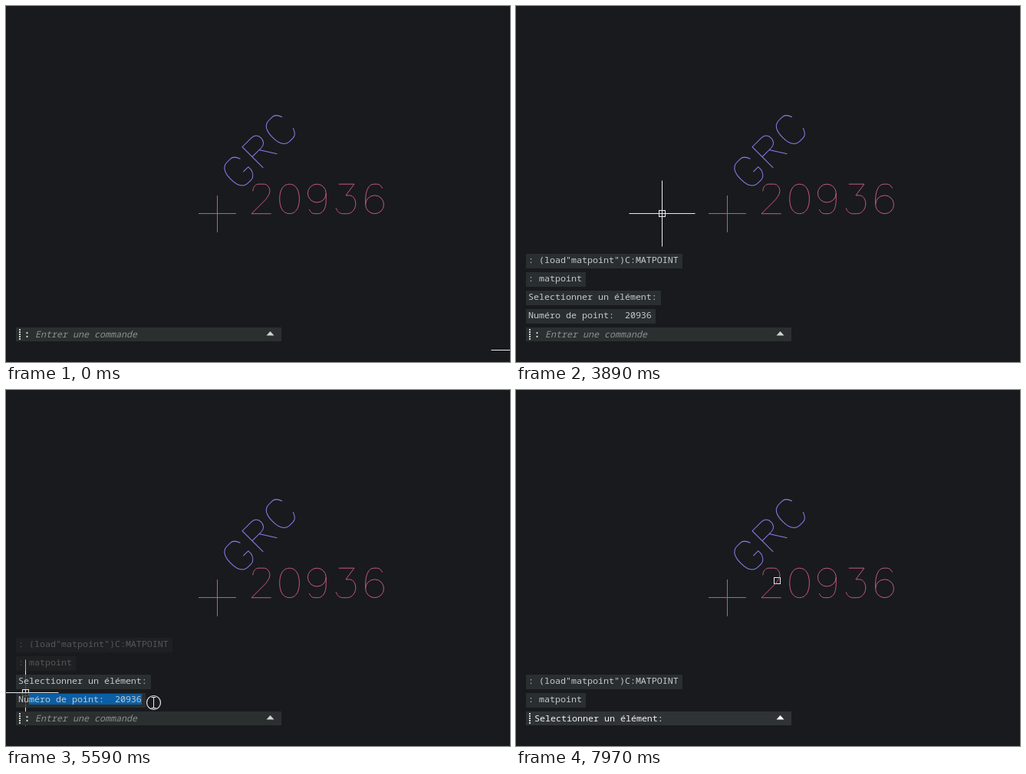
Animation of 657x464 px, one loop 8 s. Source, as an HTML page with a canvas:

```html
<!DOCTYPE html>
<html lang="fr">
<head>
<meta charset="utf-8">
<title>matpoint</title>
<style>
  html, body { margin: 0; width: 100%; height: 100%; overflow: hidden; background: #191a1d; }
  canvas { display: block; }
</style>
</head>
<body>
<canvas id="stage" width="657" height="464"></canvas>
<script>
const ctx = document.getElementById('stage').getContext('2d');
const LOOP = 8000;
const CHAR = 7;
const FONT = '11.667px "Noto Sans Mono", "DejaVu Sans Mono", monospace';
const PINK = '#c55a79', VIOLET = '#8d7cea', WHITE = '#e9eaea';

// Single-stroke glyphs on a 21 unit cap height, y up
const BOWL = 'M18 16C17 19 15.5 21 13 21H9C5 20.5 3 16.5 3 10.5S5 .5 9 0H13C15.5 0 17 2 18 5';
const GLYPHS = {
  C: BOWL,
  G: BOWL + 'V8H13',
  R: 'M4 0V21H13C16 21 18 19 18 16S16 11 13 11H4M11 11L18 0',
  0: 'M10 21C5 21 3 16 3 10.5S5 0 10 0S17 5 17 10.5S15 21 10 21',
  2: 'M4 16C4 19 6 21 8 21H12C14 21 16 19 16 16C16 14 14.5 12 13 10L3 0H17',
  3: 'M5 21H16L10 13H13C15.5 12.5 17 10 17 7C17 3 14 0 11 0H8C5.5 0 4 1.5 3 4',
  6: 'M16 18C15 20 14 21 12 21H10C6 21 4 16 4 9.5V6.5A6.5 6.5 0 1 1 17 6.5A6.5 6.5 0 1 1 4 6.5',
  9: 'M16 14.5A6.5 6.5 0 1 1 3 14.5A6.5 6.5 0 1 1 16 14.5V10C16 3 13.5 0 10 0H8C6 0 5 1 4 3'
};
const PATHS = Object.fromEntries(Object.entries(GLYPHS).map(([k, d]) => [k, new Path2D(d)]));

const LOAD = ': (load"matpoint")C:MATPOINT';
const RUN = ': matpoint';
const PICK = 'Selectionner un élément:';
const RESULT = 'Numéro de point:  20936';

const clamp = v => Math.max(0, Math.min(1, v));
const mix = (a, b, u) => a + (b - a) * u;
const span = (t, a, b) => clamp((t - a) / (b - a));
const easeOut = u => 1 - (1 - u) ** 3;
const easeInOut = u => u * u * (3 - 2 * u);

// Piecewise linear motion through [time, x, y] keys
function along(keys, t) {
  let i = 0;
  while (i < keys.length - 2 && t > keys[i + 1][0]) i++;
  const [a, b] = [keys[i], keys[i + 1]];
  const u = span(t, a[0], b[0]);
  return [mix(a[1], b[1], u), mix(a[2], b[2], u)];
}

function line(x1, y1, x2, y2, color) {
  ctx.strokeStyle = color;
  ctx.lineWidth = 1;
  ctx.beginPath();
  ctx.moveTo(x1, y1);
  ctx.lineTo(x2, y2);
  ctx.stroke();
}

function strokeText(text, x, y, angle, advance, color) {
  const scale = 1.835;
  ctx.save();
  ctx.translate(x, y);
  ctx.rotate(angle);
  ctx.scale(scale, -scale);
  ctx.strokeStyle = color;
  ctx.lineWidth = 1 / scale;
  for (const c of text) {
    ctx.stroke(PATHS[c]);
    ctx.translate(advance, 0);
  }
  ctx.restore();
}

function drawing() {
  strokeText('GRC', 302.8, 243.4, -Math.PI / 4, 21, VIOLET);
  strokeText('20936', 314.5, 270.7, 0, 20, PINK);
  line(251, 270.5, 300, 270.5, PINK);
  line(275.5, 247, 275.5, 295, PINK);
}

function pickBox(x, y) {
  ctx.strokeStyle = WHITE;
  ctx.lineWidth = 1;
  ctx.strokeRect(Math.round(x) - 3.5, Math.round(y) - 3.5, 8, 8);
}

function crosshair(x, y) {
  const cx = Math.round(x) + .5, cy = Math.round(y) + .5;
  line(cx - 43, cy, cx + 43, cy, WHITE);
  line(cx, cy - 43, cx, cy + 43, WHITE);
  pickBox(x, y);
}

function textCursor(x, y) {
  ctx.strokeStyle = WHITE;
  ctx.lineWidth = 1.2;
  ctx.beginPath();
  ctx.arc(x + .5, y + .5, 9, 0, 7);
  ctx.stroke();
  const cx = Math.round(x) + .5;
  line(cx, y - 6, cx, y + 7, WHITE);
  line(cx - 3, y - 6.5, cx + 3, y - 6.5, WHITE);
  line(cx - 3, y + 7.5, cx + 3, y + 7.5, WHITE);
}

function write(text, x, y, color, style = '') {
  ctx.font = style + FONT;
  ctx.fillStyle = color;
  ctx.fillText(text, x, y);
}

// Row 0 sits directly above the command bar
function historyRow(text, row, alpha, selectTo) {
  if (alpha <= 0) return;
  const y = 395 - row * 24;
  ctx.globalAlpha = alpha;
  ctx.fillStyle = 'rgba(46,51,52,.82)';
  ctx.fillRect(13, y, text.length * CHAR + 8, 19);
  if (selectTo > 30) {
    ctx.fillStyle = '#0b5fa5';
    ctx.fillRect(30, y + 1, selectTo - 30, 14);
  }
  write(text, 16, y + 12, '#c6caca');
  ctx.globalAlpha = 1;
}

function commandBar(state) {
  const active = state === 'pick';
  ctx.fillStyle = active ? '#2f3335' : '#2b2f30';
  ctx.fillRect(13, 419, 346, 18);
  ctx.fillStyle = '#d4d6d6';
  for (let y = 421; y < 436; y += 3) ctx.fillRect(17, y, 2, 2);
  ctx.fillStyle = active ? '#ffffff' : '#cfd2d2';
  ctx.beginPath();
  ctx.moveTo(344.5, 424);
  ctx.lineTo(349.5, 429.5);
  ctx.lineTo(339.5, 429.5);
  ctx.fill();
  if (active) write(PICK, 24, 432, '#f4f5f5');
  if (state === 'idle') {
    write(':', 24, 432, '#e2e4e4', 'bold ');
    write('Entrer une commande', 38, 432, '#8b9091', 'italic ');
  }
}

function barState(t) {
  if ((t >= 2310 && t < 2340) || (t >= 3530 && t < 3560) || (t >= 7830 && t < 7860)) return 'empty';
  return (t >= 2340 && t < 3530) || t >= 7860 ? 'pick' : 'idle';
}

function cursor(t) {
  if (t < 20) crosshair(675, 448);
  else if (t >= 2340 && t < 3560) {
    const u = easeOut(span(t, 2340, 2940));
    pickBox(mix(524, 270, u) + 5 * span(t, 3230, 3270), mix(384, 276, u));
  } else if (t >= 3560 && t < 6250) {
    const u = easeInOut(span(t, 3620, 4310));
    crosshair(mix(275, 25, u), 276 - 90 * u + 208 * u * u);
  } else if (t >= 6250 && t < 6870) {
    const back = easeOut(span(t, 6250, 6490));
    const u = 1.1 * easeInOut(span(t, 6620, 6870));
    crosshair(mix(182, 190, back) + 485 * u, mix(403, 406, back) - 149 * u + 191 * u * u);
  } else if (t >= 7860) {
    const u = easeOut(span(t, 7860, 7970));
    pickBox(mix(507, 340, u), mix(348, 248, u));
  }
}

const DRAG = [[4360, 30, 397], [4460, 50, 401], [4990, 172, 407], [5130, 180, 409], [5220, 180, 409], [5590, 192, 407]];

function history(t) {
  if ((t >= 2340 && t < 3600) || t >= 7860) {
    historyRow(LOAD, 1, 1);
    historyRow(RUN, 0, 1);
  } else if (t >= 3600 && t < 7800) {
    const old = 1 - span(t, 4100, 6300);
    const recent = 1 - span(t, 5600, 7740);
    const edge = 30 + Math.round((along(DRAG, t)[0] - 30) / CHAR) * CHAR;
    const selectTo = t >= 4360 && t < 5850 ? Math.min(177, edge) : 0;
    historyRow(LOAD, 3, old);
    historyRow(RUN, 2, old);
    historyRow(PICK, 1, recent);
    historyRow(RESULT, 0, recent, selectTo);
  }
}

function render(t) {
  ctx.fillStyle = '#191a1d';
  ctx.fillRect(0, 0, 657, 464);
  cursor(t);
  drawing();
  history(t);
  commandBar(barState(t));
  if (t >= 4300 && t < 5850) textCursor(...along(DRAG, t));
}

const start = performance.now();
function tick() {
  render((performance.now() - start) % LOOP);
  requestAnimationFrame(tick);
}
tick();
</script>
</body>
</html>
```
